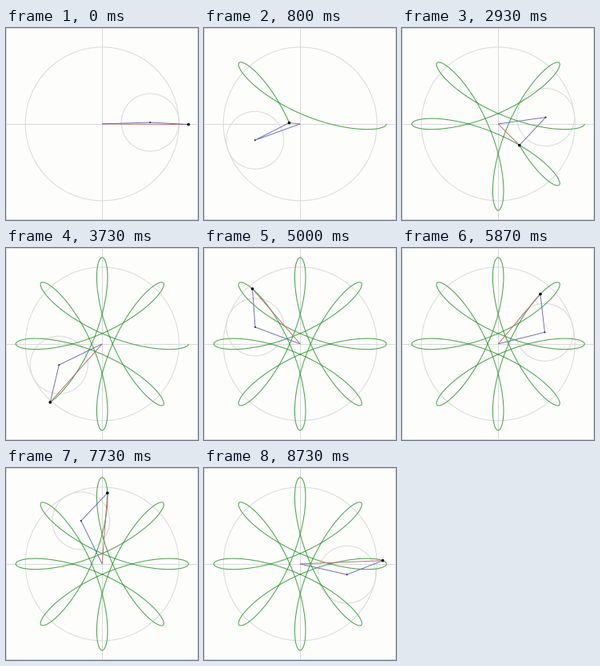
A matplotlib script for the animation above (8.79 s loop, 240 by 240 pixels).

```python
import numpy as np
import matplotlib.pyplot as plt
from matplotlib.animation import FuncAnimation
from matplotlib.patches import Circle, Rectangle

SIZE, DPI = 240, 100
CX, CY = 120.2, 119.9         # centre of the fixed circle
AXIS = 120.5                  # pixel centre of the axis lines
R, r, d = 96, 36, 48          # fixed circle, rolling circle, pen arm
FRAMES, LOOP = 132, 8790
START, STEP = 1.8, 16.503     # degrees
CLOSED = 1080                 # the curve closes after three turns
GRID, RING = "#d8d8d8", "#d9d9d9"


def px(width):
    return width * 72 / DPI


def hub(deg):
    t = np.radians(deg)
    return CX + (R - r) * np.cos(t), CY - (R - r) * np.sin(t)


def pen(deg):
    x, y = hub(deg)
    t = np.radians(deg) * (R - r) / r
    return x + d * np.cos(t), y + d * np.sin(t)


fig = plt.figure(figsize=(SIZE / DPI, SIZE / DPI), dpi=DPI, facecolor="#fdfefc")
ax = fig.add_axes([0, 0, 1, 1])
ax.set_xlim(0, SIZE)
ax.set_ylim(SIZE, 0)
ax.axis("off")


def ring(radius):
    return ax.add_patch(Circle((CX, CY), radius, fill=False, ec=RING, lw=px(1), zorder=1))


def line(color, width, z, xs=(), ys=()):
    return ax.plot(xs, ys, color=color, lw=px(width), zorder=z, snap=False,
                   solid_joinstyle="round", solid_capstyle="butt")[0]


def dot(radius, color):
    return ax.add_patch(Circle((CX, CY), radius, fc=color, ec="none", zorder=5))


ax.add_patch(Rectangle((0.5, 0.5), SIZE - 1, SIZE - 1, fill=False, ec=GRID,
                       lw=px(1), snap=False))
line(GRID, 1, 1, [AXIS, AXIS], [0, SIZE])
line(GRID, 1, 1, [0, SIZE], [AXIS, AXIS])
ring(R)
roller = ring(r)
trail = line("#4aa84a", 1.05, 2)
radius = line("#c06464", 0.9, 3)
arms = line("#6464be", 0.9, 4)
hub_dot = dot(1, "#202050")
pen_dot = dot(1.8, "#000000")


def draw(i):
    # the last step holds the pose before it
    deg = START + STEP * min(i, FRAMES - 2)
    h, p = hub(deg), pen(deg)
    end = min(deg, CLOSED)
    trail.set_data(*pen(np.linspace(0, end, int(end / 1.5) + 2)))
    roller.center = hub_dot.center = h
    pen_dot.center = p
    radius.set_data([CX, p[0]], [CY, p[1]])
    arms.set_data([CX, h[0], p[0]], [CY, h[1], p[1]])
    return trail, roller, radius, arms, hub_dot, pen_dot


anim = FuncAnimation(fig, draw, frames=FRAMES, interval=LOOP / FRAMES,
                     init_func=lambda: draw(0), repeat=True, repeat_delay=0, blit=False)
plt.show()
```
